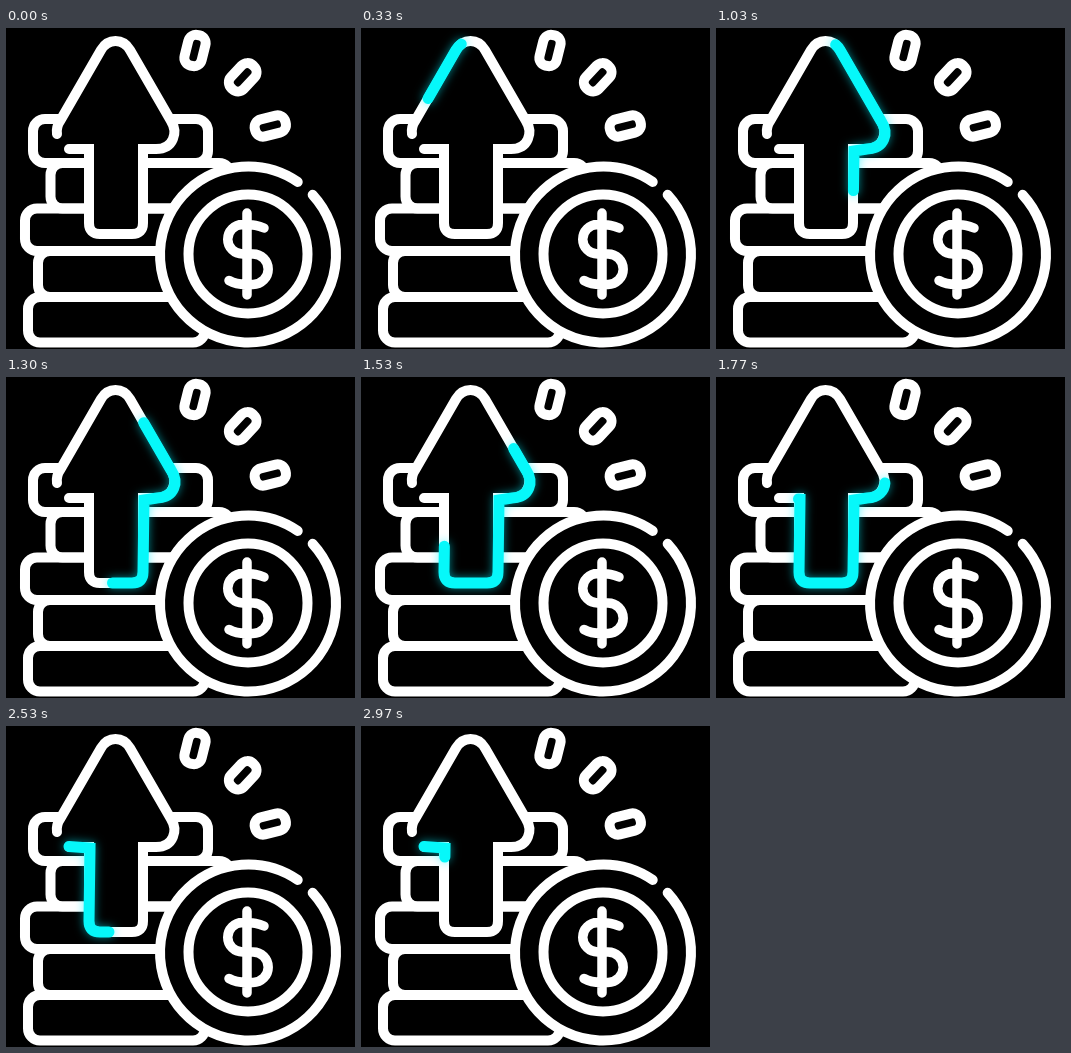
Recreate the animation shown at these times as an HTML page with a canvas. Size 349 by 321 pixels, loop 3010 ms.

```html
<!DOCTYPE html>
<html>
<head>
<meta charset="utf-8">
<style>
html, body { margin: 0; width: 349px; height: 321px; overflow: hidden; background: #000; }
canvas { display: block; }
</style>
</head>
<body>
<canvas id="stage" width="349" height="321"></canvas>
<script>
const ctx = document.getElementById('stage').getContext('2d');
const LOOP = 3010;
const STEP = 100 / 3;
const LENGTH = 500;
const TAU = Math.PI * 2;

const arrow = new Path2D('M51 106 Q50 99 54 93 L95 22 C102 10 117 10 124 22 L165 93 C172 104 168 121 150 121 H137 V195 Q137 206 126 206 H94 Q83 206 83 195 V121 H63');
const trail = new Path2D('M51 106 Q50 99 54 93 L95 22 C102 10 117 10 124 22 L165 93 C173 105 169 120 151 121 L138 123 L137 195 Q137 206 126 206 H94 Q83 206 83 195 L84 122 L63 120.5');
const dollar = new Path2D('M241 185 V267 M258 200 Q250 196.5 240 196.5 H236.5 A14.75 14.75 0 0 0 236.5 226 H247 A15.2 15.2 0 0 1 247 256.4 H240 Q230 256.4 223 252.5');

// [left, top, right, bottom]; the coin hides the right ends
const stack = [
  [27, 91, 202, 135],
  [44.5, 135, 225, 180.5],
  [19, 180.5, 215, 223],
  [32, 223, 200, 269],
  [22, 269, 199, 314.5]
];

// [time, distance along the arrow]
const tailKeys = [[0, 0], [630, 75], [1030, 124], [1530, 188], [2070, 277], [2530, 378], [2970, 470], [3010, 478]];

function tailAt(t) {
  const i = Math.max(1, tailKeys.findIndex(k => t <= k[0]));
  const [t0, a] = tailKeys[i - 1], [t1, b] = tailKeys[i];
  return a + (b - a) * (t - t0) / (t1 - t0);
}

function headAt(t) {
  return LENGTH * (1 - Math.max(0, 1 - t / 1897) ** 1.2);
}

function arc(x, y, r, from = 0, to = TAU) {
  const p = new Path2D();
  p.arc(x, y, r, from, to);
  return p;
}

function box(left, top, right, bottom, r) {
  const p = new Path2D();
  p.roundRect(left, top, right - left, bottom - top, r);
  return p;
}

function line(path, width = 10) {
  ctx.lineWidth = width;
  ctx.stroke(path);
}

function spark(x, y, degrees) {
  ctx.save();
  ctx.translate(x, y);
  ctx.rotate(degrees * Math.PI / 180);
  line(box(-8.8, -15.7, 8.8, 15.7, 8));
  ctx.restore();
}

function drawIcon() {
  stack.forEach(edges => line(box(...edges, 12)));

  ctx.fill(arrow);
  line(arrow);

  ctx.fill(arc(242, 226.5, 88));
  line(arc(242, 226.5, 88, Math.atan2(-60, 65), Math.atan2(-73, 50) + TAU));
  line(arc(242, 226, 59.5));
  line(dollar, 9.5);

  spark(189, 22.5, 14);
  spark(236.7, 49.3, 43);
  spark(264.3, 98, 76);
}

function drawTrail(t) {
  const tail = tailAt(t);
  const length = headAt(t) - tail;
  if (length <= 0) return;
  ctx.save();
  ctx.strokeStyle = '#06f8fa';
  ctx.shadowColor = 'rgba(0, 240, 255, 0.55)';
  ctx.shadowBlur = 10;
  ctx.setLineDash([length, 2000]);
  ctx.lineDashOffset = -tail;
  line(trail, 11);
  ctx.restore();
}

function draw(t) {
  ctx.fillStyle = '#000';
  ctx.strokeStyle = '#fff';
  ctx.lineCap = 'round';
  ctx.fillRect(0, 0, 349, 321);
  drawIcon();
  drawTrail(t);
}

const start = performance.now();
function tick() {
  const t = (performance.now() - start) % LOOP;
  const step = Math.min(89, Math.floor((t + 3.4) / STEP));
  draw(step * STEP);
  requestAnimationFrame(tick);
}
draw(0);
requestAnimationFrame(tick);
</script>
</body>
</html>
```
